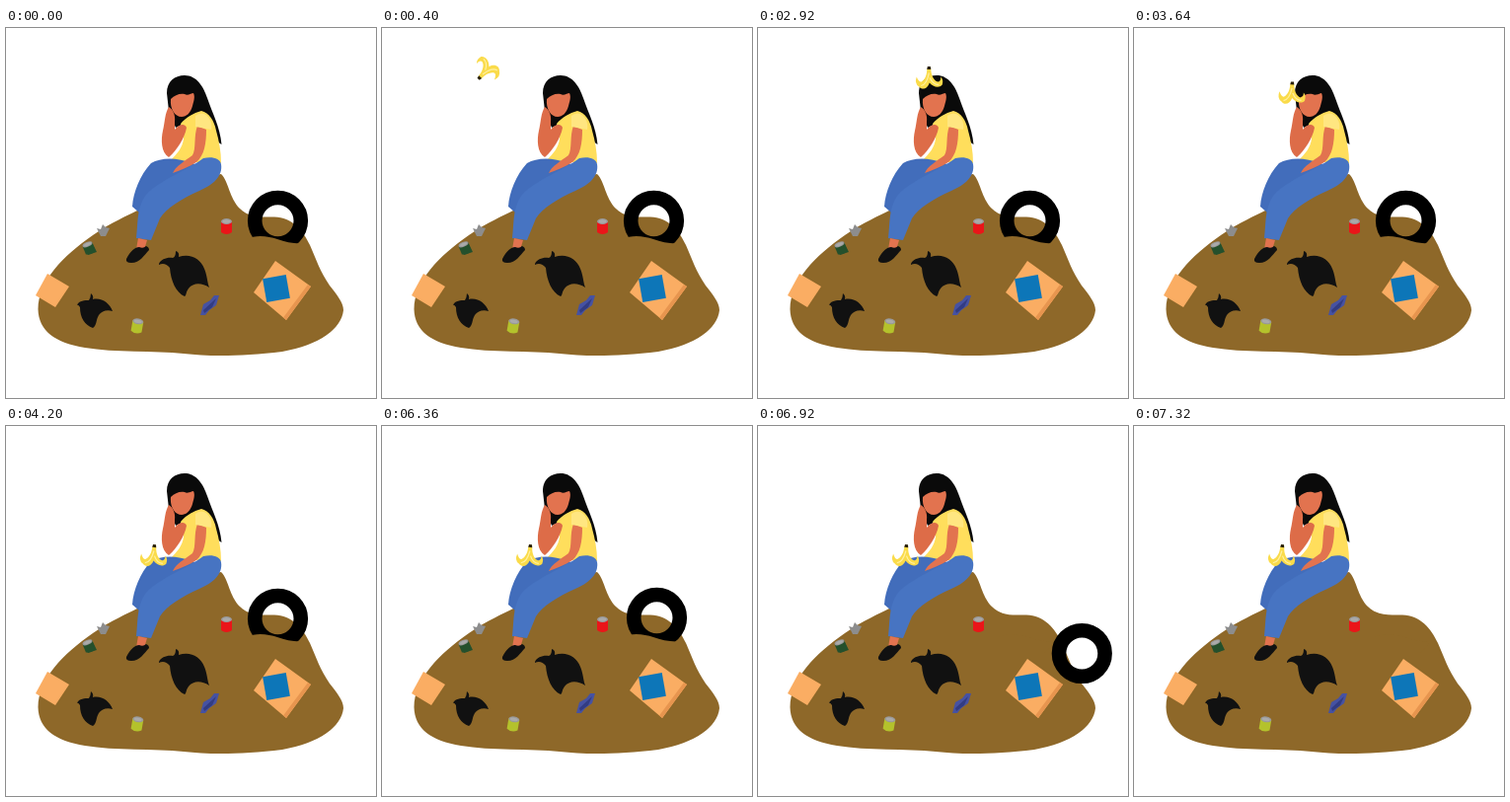
These frames come from a looping animation (375 by 375 pixels, 8 s). An HTML page:

```html
<!DOCTYPE html>
<html lang="en">
<head>
<meta charset="utf-8">
<title>On the heap</title>
<style>
  html, body { margin: 0; width: 100%; height: 100%; overflow: hidden; background: #fff; }
  svg { display: block; width: 100%; height: 100%; }
</style>
</head>
<body>
<svg viewBox="0 0 375 375">
  <defs>
    <g id="can">
      <path d="M-5.5 -5V6Q0 10 5.5 6V-5Z"/>
      <ellipse cy="-5" rx="5.5" ry="3" fill="#999"/>
      <ellipse cy="-5" rx="4" ry="1.8" fill="#aaa"/>
    </g>
  </defs>

  <path fill="#8e6829" d="M32.5 285C33 256 58 231 88 210C108 196 122 191 135 184L155 168L205 150L218 148C226 156 226 172 237 183C248 194 262 191 272 191.5C290 192 301 205 308 220C315 236 318 246 328 261C335 270 342 278 342 286C340 305 318 321 280 328C240 333 205 333 180 330C150 327 110 329 80 324C50 319 33 307 32.5 285Z"/>

  <!-- litter -->
  <path fill="#8d8d8d" d="M92 203L96 204L98 199L101 202L105 203L103 207L101 211L96 211Z"/>
  <path fill="#24502c" d="M78 222L88 219L92 227L83 230Z"/>
  <use href="#can" fill="#24502c" transform="translate(84 223) rotate(-22) scale(.95 .8)"/>
  <use href="#can" fill="#ea1519" transform="translate(223.5 201)"/>
  <use href="#can" fill="#b4c22c" transform="translate(133 302) rotate(10) scale(1 .95)"/>
  <path fill="#4652a2" d="M197 291L200 280L207 276L211 271L216 271L213 281L206 286L202 291Z"/>
  <path fill="#323c83" d="M200 286L213 274L209 283L201 289Z"/>
  <path fill="#111" d="M155 239C157 234 164 232 169 233Q172 232 172 226Q176 227 175 232C186 228 197 233 201 244C204 251 204 258 206 263C198 258 190 258 185 264C182 268 183 271 181 272C172 268 167 256 166 243Q161 237 155 240Z"/>
  <path fill="#111" d="M72 281C74 276 80 276 84 276Q86 273 86 269Q89 271 88 275C97 273 105 279 108 287C102 285 97 287 94 291C91 296 92 302 88 304C80 301 75 294 75 283Q73 280 72 281Z"/>
  <path fill="#faad63" d="M42 249L64 262L50 283L30 271Z"/>
  <path fill="#faad63" d="M273 236L309 262L284 296L251 268Z"/>
  <path fill="#e7954f" d="M309 262L284 296L281 293.5L306 260Z"/>
  <rect x="-12" y="-12" width="24" height="24" fill="#0d76b8" transform="translate(274 264) rotate(-10)"/>

  <!-- seated woman -->
  <path fill="#0a0a0a" d="M163 66C163 54 171 48 181 48C193 48 200 59 204 71C209 86 217 100 218.5 118C213 115 210 108 207 101L190 92L172 101L165 84Z"/>
  <path fill="#ffde5c" d="M177 97C182 91 190 86 198 84C206 86 211 94 213 104C216 115 218 125 218 137L166 135C174 127 179 121 180 112Z"/>
  <path fill="#e2734f" d="M167 72C171 68 176 66 181 67C184 69 188 66 190 66C192 70 190 75 189 79C187 86 183 90 178 90C171 90 166 82 167 72Z"/>
  <path fill="#dd6c48" d="M165 80C169 82 172 88 171 95L171 103C175 98 181 96 183 101C181 112 173 124 165 131C157 126 157 113 159 104C161 96 161 86 165 80Z"/>
  <path fill="#426dbb" d="M147 137C157 131 174 131 188 137L208 142L168 165C151 175 142 183 135 187L128 181C129 166 136 149 147 137Z"/>
  <path fill="#4774c2" d="M218 138C220 150 210 159 196 165C178 173 162 183 156 193L147 215L132 213C134 199 132 182 142 169C156 154 184 144 200 132C209 130 217 132 218 138Z"/>
  <path fill="#e2734f" d="M194 99L203 103C203 117 201 129 193 136C185 141 177 144 169 147C172 140 181 135 189 129C193 122 190 110 194 99Z"/>
  <path fill="#ffe681" d="M192 89C201 82 210 92 208 103L192 100Z"/>
  <path fill="#e2734f" d="M134 213L143 215L140 225L132 224Z"/>
  <path fill="#111" d="M122 234C126 226 131 222 135 222Q139 224 142 221Q145 222 145 225C140 230 136 238 127 238Q121 238 122 234Z"/>

  <circle id="tire" r="23.3" fill="none" stroke="#000" stroke-width="14.6"/>
  <path fill="#8e6829" d="M243 214C254 209 266 211 275 214Q286 218 298 218.5Q300 223 290 230H243Z"/>

  <g id="banana">
    <path fill="#fadb4a" d="M-2 -9H2C2 -3 5 3 9 4Q12 4 12 -1Q15 2 13.5 7C10 11 4 9 .5 5C-1 11 -7 13 -10 9Q-15 6 -12.5 -1Q-10 5 -7.5 4C-4 2 -2 -3 -2 -9Z"/>
    <path fill="none" stroke="#fff0a0" stroke-width="1.2" d="M0 -5Q-2 7 -8 8M1 0Q4 7 10 7"/>
    <path fill="#2a2108" d="M-1.5 -11.5H1.5L2 -8.5H-2Z"/>
  </g>
</svg>
<script>
const LOOP = 8000, STEP = 40;
const tire = document.getElementById('tire');
const banana = document.getElementById('banana');

// Each key is [time, x, y, angle].
const toss = [[0, -18, 61, -360], [360, 92, 44, -160], [600, 172, 46, -25], [720, 174, 50.5, 0]];
const roll = [
  [6320, 275.5, 195.3, 0], [6360, 278.5, 194.3, 0], [6520, 290, 192.2, 0], [6720, 307, 204, 0],
  [6920, 328.3, 230.5, 0], [7160, 369, 272, 0], [7320, 407, 282, 0]
];

// Smooth curve through the keys, with slopes taken from the neighbouring keys.
function along(keys, time) {
  const last = keys.length - 1;
  if (time <= keys[0][0]) return keys[0].slice(1);
  if (time >= keys[last][0]) return keys[last].slice(1);
  const i = keys.findIndex(key => key[0] > time) - 1;
  const a = keys[i], b = keys[i + 1];
  const before = keys[Math.max(0, i - 1)], after = keys[Math.min(last, i + 2)];
  const span = b[0] - a[0], u = (time - a[0]) / span;
  return [1, 2, 3].map(k => {
    const slopeA = (b[k] - before[k]) / (b[0] - before[0]) * span;
    const slopeB = (after[k] - a[k]) / (after[0] - a[0]) * span;
    const d = b[k] - a[k];
    return a[k] + u * (slopeA + u * (3 * d - 2 * slopeA - slopeB + u * (slopeA + slopeB - 2 * d)));
  });
}

// The peel slides evenly to the left while it drops ever faster.
function bananaPose(time) {
  if (time < 2920) return along(toss, time);
  const u = Math.min(1, (time - 2880) / 1320);
  return [174 - 24.5 * u, 50.5 + 81 * u ** 3, 5 * u];
}

function place(node, [x, y, angle]) {
  node.setAttribute('transform', `translate(${x} ${y}) rotate(${angle})`);
}

function draw() {
  const time = Math.floor(performance.now() % LOOP / STEP) * STEP;
  place(banana, bananaPose(time));
  place(tire, along(roll, time));
  requestAnimationFrame(draw);
}
draw();
</script>
</body>
</html>
```
